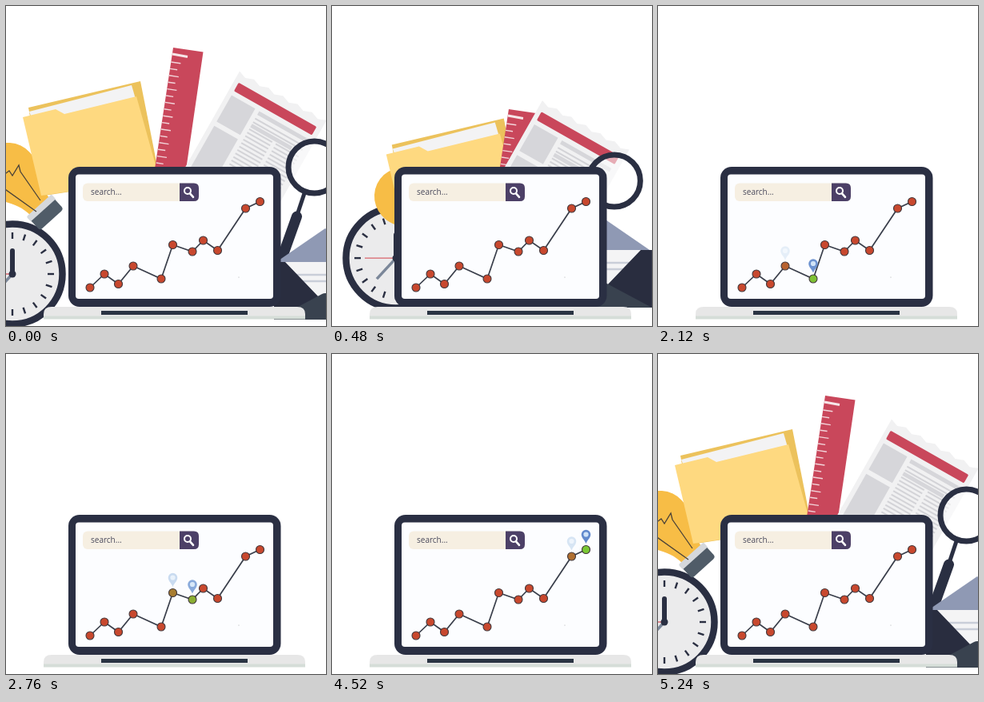
Animation of 400 by 400 pixels, one loop 5.72 s. Source, as an HTML page:

```html
<!DOCTYPE html>
<html lang="en">
<head>
<meta charset="utf-8">
<title>Search chart</title>
<style>
  html, body { margin: 0; width: 100%; height: 100%; overflow: hidden; background: #fff; }
  svg { display: block; width: 100vw; height: 100vh; }
</style>
</head>
<body>
<svg viewBox="0 0 400 400">
  <defs>
    <clipPath id="desk"><rect width="400" height="380"/></clipPath>
  </defs>

  <g id="props">
    <g id="clock">
      <g transform="translate(8 335)">
        <circle r="62.5" fill="#ebebec" stroke="#2a2f42" stroke-width="8.5"/>
        <g id="ticks" stroke="#2a2f42" stroke-width="2.4"/>
        <path d="M0 0L-24 26" stroke="#7b8799" stroke-width="3.5"/>
        <path d="M0 0H-39" stroke="#d9636b" stroke-width="1.3"/>
        <path d="M0 0V-29" stroke="#2a2f42" stroke-width="6" stroke-linecap="round"/>
        <circle r="4.5" fill="#2a2f42"/>
      </g>
    </g>

    <g id="bulb">
      <g transform="translate(3 207) rotate(-42)">
        <path d="M-36 0A36 36 0 1 1 36 0C36 24 17 32 16 60H-16C-17 32-36 24-36 0Z" fill="#f7bd46"/>
        <rect x="-21" y="57" width="42" height="9" rx="2" fill="#d5d8dc"/>
        <path d="M-20 65H20V77Q20 81 16 81H-16Q-20 81-20 77Z" fill="#505c68"/>
      </g>
      <path d="M-4 212L4 206L8 212L16 199L18 207L43 243M-4 227L38 257" fill="none" stroke="#4b4338" stroke-width="1.3"/>
    </g>

    <g clip-path="url(#desk)">
      <g id="folder">
        <path d="M28 127L168 94L192 215L48 237Z" fill="#ecc25c"/>
        <path d="M29 132L157 99L166 130L40 160Z" fill="#f3f3f4"/>
        <path d="M21 139L62 129L73 135L163 113L191.500 215L44 237Z" fill="#fed980"/>
      </g>
      <g id="ruler">
        <path d="M209 52L246.500 57.500L223.500 215L185 210Z" fill="#c9475b"/>
        <path d="M208 60L227 63.500" stroke="#f6e6e8" stroke-width="3"/>
        <g id="marks" stroke="#f2d5da" stroke-width="1.4"/>
      </g>
      <g id="news">
        <g transform="translate(292 81.500) rotate(29.500)">
          <path id="sheet" fill="#f1f1f2"/>
          <rect x="6" y="13" width="112" height="12" rx="1.500" fill="#c9475b"/>
          <path d="M6 31H40V69H6ZM6 75H40V138H6Z" fill="#d6d6da"/>
          <path d="M46 34H117M46 52H104" stroke="#d6d6da" stroke-width="5"/>
          <g id="copy" stroke="#d3d3d7" stroke-width="2"/>
        </g>
      </g>
    </g>

    <g id="glass">
      <path d="M373 234L365 258" stroke="#2a2f42" stroke-width="5"/>
      <path d="M363.500 263L346 312" stroke="#2a2f42" stroke-width="13" stroke-linecap="round"/>
      <circle cx="385.500" cy="201.500" r="32.500" fill="#fff" fill-opacity=".55" stroke="#2a2f42" stroke-width="7"/>
    </g>

    <g id="mail">
      <g transform="translate(335 322)">
        <path d="M0 0L64-44L128 0Z" fill="#8f99b4"/>
        <path d="M6-2H122V50H6Z" fill="#f4f4f5"/>
        <path d="M14 14H114M14 22H114" stroke="#c9ced8" stroke-width="2.500"/>
        <path d="M0-2H14L58 44H70L114-2H128V70H0Z" fill="#292d3f"/>
        <path d="M0 70L60 38Q64 36 68 38L128 70Z" fill="#39424f"/>
      </g>
    </g>
  </g>

  <rect x="78" y="201" width="265.500" height="175" rx="14" fill="#2a2f43"/>
  <rect x="87" y="210.500" width="247" height="155.500" rx="4" fill="#fcfdff"/>
  <path d="M47 391V385Q47 376 57 376H364Q374 376 374 385V391Z" fill="#e7e7e7"/>
  <path d="M47 387.500H374V391.500H47Z" fill="#d5ddd8"/>
  <rect x="119" y="381" width="183" height="5" fill="#2a3443"/>
  <circle cx="291" cy="339" r=".6" fill="#aaa"/>

  <rect x="96" y="221.500" width="145" height="22.500" rx="6" fill="#f6efe2"/>
  <path d="M217 221.500H235Q241 221.500 241 227.500V238Q241 244 235 244H217Z" fill="#4c4067"/>
  <circle cx="227" cy="231" r="4" fill="none" stroke="#fff" stroke-width="2"/>
  <path d="M230 234.300L234 238.800" stroke="#fff" stroke-width="2.600" stroke-linecap="round"/>
  <text x="106" y="236" font-family="'Open Sans', 'Noto Sans', sans-serif" font-size="10" fill="#4a4a5c">search...</text>

  <polyline id="line" fill="none" stroke="#3a3f4b" stroke-width="1.7"/>
  <g id="dots"/>
</svg>

<script>
const LOOP = 5720, STEP = 40;
const NS = 'http://www.w3.org/2000/svg';
const $ = id => document.getElementById(id);
const clamp = v => Math.max(0, Math.min(1, v));

function add(parent, tag, attrs) {
  const el = document.createElementNS(NS, tag);
  for (const k in attrs) el.setAttribute(k, attrs[k]);
  parent.appendChild(el);
  return el;
}

const stroke = (parent, x1, y1, x2, y2) => add(parent, 'line', { x1, y1, x2, y2 });

// Repeated details of the props
for (let i = 0; i < 20; i++) {
  const a = i * Math.PI / 10, c = Math.cos(a), s = Math.sin(a);
  stroke($('ticks'), c * 44, s * 44, c * 52, s * 52);
}
for (let i = 0; i < 17; i++) {
  const y = 70 + i * 8.4, x = 209 - (y - 52) * 0.148, len = i % 2 ? 9 : 12;
  stroke($('marks'), x, y, x + len, y + len * 0.15);
}
for (let i = 0; i < 19; i++) {
  const y = 42 + i * 5;
  if (i === 2) continue;
  stroke($('copy'), 46, y, i < 2 ? 117 : 79, y);
  if (i > 2) stroke($('copy'), 84, y, 117, y);
}
let edge = 'M0 0';
for (let i = 1; i <= 12; i++) edge += `L${i * 10.4} ${i % 2 ? 4 : 0}`;
$('sheet').setAttribute('d', edge + 'V190H0Z');

// Hidden offsets: leaving (x, y), returning (x, y), delay on leaving
const props = [
  ['clock', 217, -60, 213, -54, 0],
  ['bulb', 259, 93, 249, 99, 0],
  ['folder', 141, 140, 129, 168, 0],
  ['ruler', 36, 232, 15, 228, 0],
  ['news', -120, 151, -135, 171, 20],
  ['glass', -135, 70, -163, 64, 20],
  ['mail', -190, -45, -216, -51, 0]
].map(([id, ox, oy, ix, iy, delay]) => ({ el: $(id), ox, oy, ix, iy, delay }));

const backIn = u => u * u * (2.70158 * u - 1.70158);

function moveProps(t) {
  $('props').setAttribute('visibility', t >= 600 && t < 4760 ? 'hidden' : 'visible');
  for (const p of props) {
    let x, y;
    if (t < 2000) {
      const k = backIn(clamp((t - 40 - p.delay) / 540));
      x = p.ox * k; y = p.oy * k;
    } else {
      const k = Math.pow(1 - clamp((t - 4740) / 500), 1.5);
      x = p.ix * k; y = p.iy * k;
    }
    p.el.setAttribute('transform', `translate(${x.toFixed(2)} ${y.toFixed(2)})`);
  }
}

// Chart points, each with the time its pin begins to show
const points = [
  [105, 352, 600], [123, 335, 890], [140.5, 347.5, 1210], [159, 325, 1480],
  [194, 341, 1840], [208.5, 298.5, 2190], [233, 307, 2545], [246.5, 293, 2910],
  [264.5, 305.5, 3275], [299.5, 253, 3640], [317.5, 244.5, 4020]
];
const starts = points.map(p => p[2]).concat(4740, 5240);
$('line').setAttribute('points', points.map(p => p[0] + ',' + p[1]).join(' '));

const marks = points.map(([x, y]) => {
  const g = add($('dots'), 'g', { transform: `translate(${x} ${y})` });
  const dot = add(g, 'circle', { r: 5, stroke: '#40363a', 'stroke-width': 1.1 });
  const pin = add(g, 'g', {});
  const body = add(pin, 'path', { d: 'M0-7.500C-1.500-12-5.800-14.500-5.800-19A5.800 5.800 0 0 1 5.800-19C5.800-14.500 1.500-12 0-7.500Z' });
  add(pin, 'circle', { cy: -19, r: 3.1, fill: '#cfe3f7' });
  return { dot, pin, body };
});

const mix = (a, b, k) => `rgb(${a.map((v, i) => Math.round(v + (b[i] - v) * k))})`;
const RED = [200, 72, 46], GREEN = [122, 200, 52];
const PALE = [150, 196, 230], BLUE = [98, 138, 205];

function glow(i, t) {
  const rise = Math.min(500, starts[i + 1] - starts[i]);
  const up = 1 - Math.pow(1 - clamp((t - starts[i]) / rise), 1.8);
  const down = 1 - clamp((t - starts[i + 1]) / (starts[i + 2] - starts[i + 1]));
  return up * down;
}

function draw(t) {
  moveProps(t);
  marks.forEach((m, i) => {
    const k = glow(i, t);
    m.dot.setAttribute('fill', mix(RED, GREEN, k));
    m.body.setAttribute('fill', mix(PALE, BLUE, k));
    m.pin.setAttribute('opacity', k.toFixed(3));
  });
}

const begin = performance.now();
function tick() {
  const t = (performance.now() - begin) % LOOP;
  draw(Math.floor(t / STEP) * STEP);
  requestAnimationFrame(tick);
}
tick();
</script>
</body>
</html>
```
